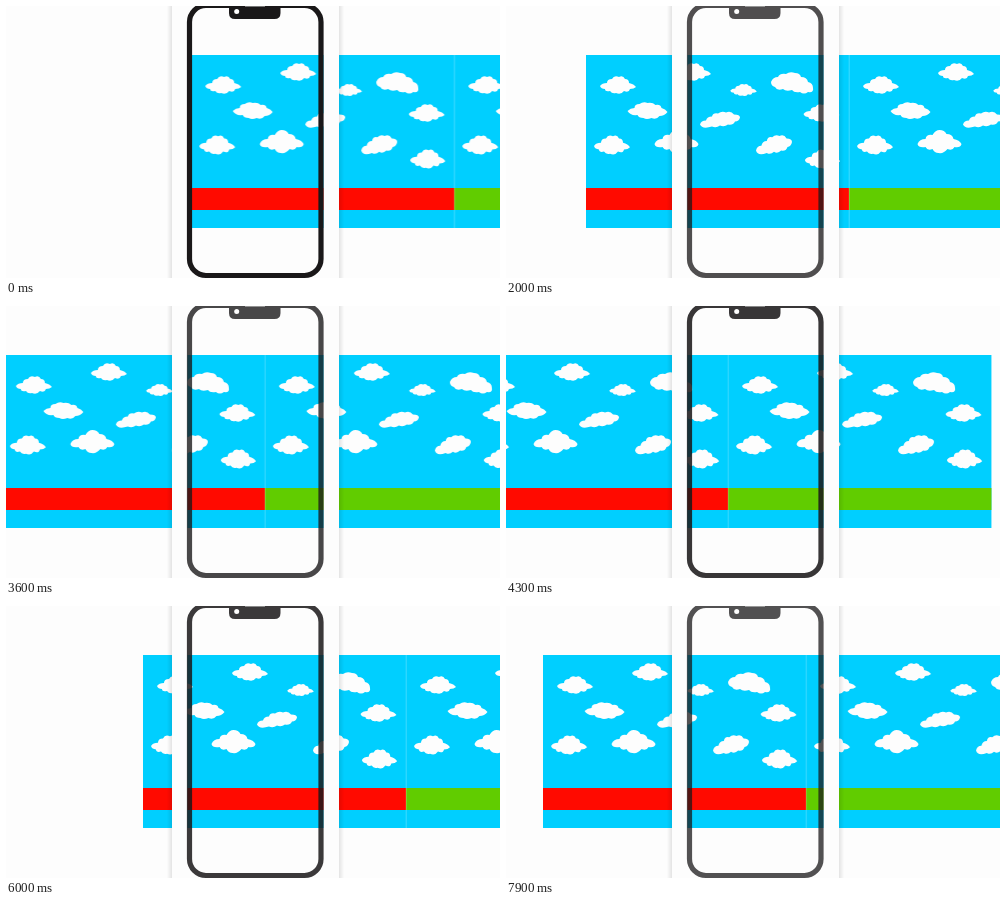
An HTML page without scripts for the animation above (8 s loop, 494x272 px).

```html
<!DOCTYPE html>
<html lang="en">
<head>
<meta charset="utf-8">
<title>Scrolling sky behind a phone</title>
<style>
  html, body { margin: 0; width: 100%; height: 100%; overflow: hidden; background: #fdfdfd; }
  svg { display: block; width: 494px; height: 272px; }

  .strip { animation: scroll 8s -5ms infinite; }
  .phone { animation: fade 8s infinite; }

  /* The strip moves 5.26px every 100ms and snaps back after 5.1s. */
  @keyframes scroll {
    0% { transform: translateX(185.2px); animation-timing-function: steps(51); }
    63.749% { transform: translateX(-83.06px); animation-timing-function: step-end; }
    63.75% { transform: translateX(184.3px); animation-timing-function: steps(29); }
    100% { transform: translateX(31.76px); }
  }

  /* Parabolic dip in opacity over each pass. */
  @keyframes fade {
    0%, 63.5% { opacity: 1; animation-timing-function: cubic-bezier(.333, .667, .667, 1); }
    31.75%, 95.25% { opacity: .75; animation-timing-function: cubic-bezier(.333, 0, .667, .333); }
    100% { opacity: .755; }
  }
</style>
</head>
<body>
<svg viewBox="0 0 494 272">
  <defs>
    <path id="puff" d="M-18 1Q-16-2-11-2Q-11-6-6-6Q-4-10 1-8Q5-10 7-6Q11-6 11-2Q16-1 18 2Q16 4 12 4Q11 8 6 6Q3 10-2 8Q-6 9-8 6Q-13 7-13 4Q-17 4-18 1Z"/>
    <path id="wide" d="M-20 0Q-17-3-13-3Q-13-7-8-7Q-4-10 0-8Q5-9 8-6Q13-7 14-3Q18-2 20 1Q17 5 12 5Q9 9 4 7Q-1 9-4 7Q-9 7-10 4Q-17 5-20 0Z"/>
    <path id="peak" d="M-22 2Q-20-3-14-3Q-13-8-7-7Q-4-12 0-12Q5-12 7-8Q13-8 14-3Q20-2 22 2Q21 6 15 5Q13 9 8 7Q4 12-1 11Q-5 11-7 7Q-12 9-14 5Q-21 6-22 2Z"/>
    <path id="slope" d="M-21-1Q-19-6-14-6Q-12-10-6-9Q-2-12 3-10Q8-10 9-6Q15-6 16-1Q21 0 21 5Q22 10 16 9Q12 12 8 9Q2 10 0 7Q-6 9-9 6Q-15 8-17 4Q-21 3-21-1Z"/>
    <path id="rise" d="M-20 5Q-19 1-14 1Q-13-3-8-3Q-7-7-2-6Q2-9 6-7Q11-9 14-5Q20-5 20-2Q19 2 15 2Q13 6 8 5Q4 8 0 6Q-4 9-8 7Q-18 10-20 5Z"/>
    <g id="clouds" fill="#fdfdfd">
      <use href="#puff" x="32" y="79"/>
      <use href="#puff" x="107" y="66"/>
      <use href="#puff" transform="translate(157.5 84) scale(.74 .7)"/>
      <use href="#slope" x="206" y="77"/>
      <use href="#wide" x="61.5" y="105"/>
      <use href="#rise" x="134" y="113.5"/>
      <use href="#puff" x="235.5" y="107"/>
      <use href="#puff" transform="translate(26 139) scale(1 1.1)"/>
      <use href="#peak" x="90.5" y="136"/>
      <use href="#rise" transform="translate(188 138.5) scale(.9 1.2)"/>
      <use href="#puff" transform="translate(236.5 153) scale(.98 1.1)"/>
    </g>
    <g id="tile">
      <path d="M0 49H263.4V222H0Z" fill="#00cfff"/>
      <path d="M0 182H263.4V204H0Z"/>
      <use href="#clouds"/>
    </g>
    <linearGradient id="shade">
      <stop offset="0" stop-color="#000" stop-opacity="0"/>
      <stop offset="1" stop-color="#000" stop-opacity=".1"/>
    </linearGradient>
    <g id="side">
      <path d="M161 0H166V272H161Z" fill="url(#shade)"/>
      <path d="M166 0H181.5V272H166Z" fill="#fdfdfd"/>
    </g>
  </defs>

  <g class="strip">
    <use href="#tile" fill="#ff0a00"/>
    <use href="#tile" x="263" fill="#61cc00"/>
    <path d="M263.2 49V222" stroke="#fff" stroke-opacity=".5" stroke-width=".5"/>
  </g>

  <use href="#side"/>
  <use href="#side" transform="matrix(-1 0 0 1 499 0)"/>

  <g class="phone">
    <rect x="183.5" y="-.5" width="131.5" height="270" rx="16.5" fill="none" stroke="#1a1819" stroke-width="5.2"/>
    <path d="M223 0H274.500V7Q274.500 13 268.500 13H229Q223 13 223 7Z" fill="#1a1819"/>
    <circle cx="230.700" cy="5.600" r="2.500" fill="#fdfdfd"/>
    <path d="M239 0H259V1H239Z" fill="#777"/>
  </g>
</svg>
</body>
</html>
```
